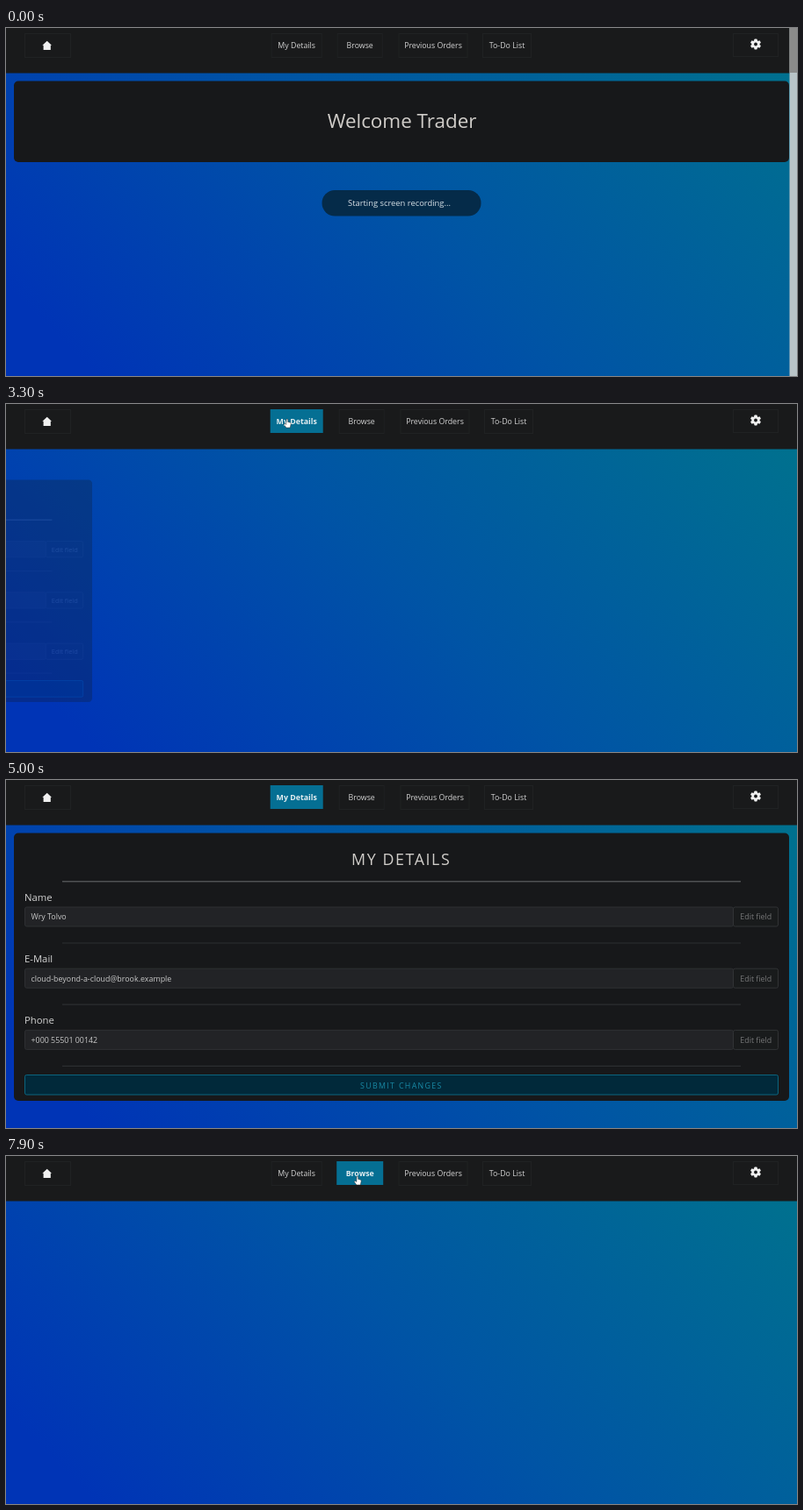
Animation of 900x397 px, one loop 8 s. Source, as an HTML page:

```html
<!DOCTYPE html>
<html lang="en">
<head>
<meta charset="utf-8">
<title>Trader dashboard</title>
<style>
  html, body { margin: 0; width: 100%; height: 100%; overflow: hidden; background: #0052a4; }
  svg { display: block; width: 100vw; height: 100vh; }
  text { font-family: "Open Sans", "Noto Sans", sans-serif; font-size: 8.8px; font-weight: 500; fill: #d3d3d3; }
  .mid { text-anchor: middle; }
  .cell { fill: none; stroke: #202223; }
  .active { fill: #056f93; stroke: none; }
  .active + text { font-weight: 650; fill: #e4eef1; }
  .card { fill: #17181a; }
  .title { font-size: 17.8px; letter-spacing: 1.6px; fill: #d0cdc9; }
  .label { font-size: 11.3px; }
  .value { font-size: 8.9px; fill: #c9c9c9; }
  .edit { font-size: 8.9px; fill: #757677; }
  .input { fill: #222326; stroke: #2e3033; }
  .button { fill: #191b1c; stroke: #313335; }
  .submit { fill: #01293a; stroke: #0b657f; }
  .submit + text { letter-spacing: 1.35px; fill: #1989a5; }
</style>
</head>
<body>
<svg viewBox="0 0 900 397" preserveAspectRatio="none">
  <defs>
    <linearGradient id="sky" gradientUnits="userSpaceOnUse" x1="0" y1="397" x2="648.5" y2="-251.5">
      <stop offset=".08" stop-color="#0034b6"/>
      <stop offset=".5" stop-color="#0054a5"/>
      <stop offset=".95" stop-color="#00708f"/>
    </linearGradient>
  </defs>
  <rect width="900" height="397" fill="url(#sky)"/>

  <g id="welcome">
    <rect class="card" x="9" y="60.5" width="882" height="92.5" rx="5"/>
    <text class="mid" x="450.5" y="113.5" style="font-size:22.4px;fill:#d0cdc9">Welcome Trader</text>
  </g>

  <g id="details">
    <rect class="card" x="9" y="60.5" width="882" height="305.5" rx="5"/>
    <text class="title" x="393" y="97">MY DETAILS</text>
    <path d="M64 115.7H836" stroke="#505254" stroke-width="1.6"/>
    <g id="fields"></g>
    <rect class="submit" x="21.5" y="336.5" width="857" height="22.5" rx="2"/>
    <text x="403" y="351.5">SUBMIT CHANGES</text>
  </g>

  <rect width="900" height="51.5" fill="#191a1b"/>
  <rect class="cell" x="21.5" y="6.5" width="52" height="27"/>
  <rect class="cell" x="827.5" y="6.5" width="51" height="26"/>
  <path d="M46.7 14.8L52 19.8H50.8V25H42.6V19.8H41.4Z" fill="#f0f0f0"/>
  <g id="gear" fill="#f0f0f0" transform="translate(853 18.5)"></g>
  <g id="nav"></g>

  <g id="toast">
    <rect x="359.5" y="185" width="181" height="29.5" rx="14.7" fill="#052b49"/>
    <text x="389" y="203" style="font-size:9.4px;font-weight:400;fill:#d8e0e6">Starting screen recording...</text>
  </g>
  <rect id="scrollbar" x="891.5" width="8.5" height="397" fill="#b9c4c8"/>
  <rect id="scrollthumb" x="891.5" width="8.5" height="51" fill="#8b8b8b"/>

  <g id="cursor" fill="#fff" stroke="#222" stroke-width=".5">
    <path id="arrow" d="M0 0V7.6L1.7 6.1L2.8 8.6L4.1 8L3 5.6H5.3Z"/>
    <path id="hand" d="M-1 -4.6Q0 -5.4 .7 -4.4V-1.6L3.2 -1Q4.4 -.6 4.2 .8L3.3 5H-1.2L-3.7 1.4Q-3.6 .1 -2.3 .6L-1.2 1.4Z"/>
  </g>
</svg>

<script>
const LOOP = 8000, STEP = 100;
const $ = id => document.getElementById(id);

const tabs = [
  { name: 'My Details', x: 330.7, w: 57 },
  { name: 'Browse', x: 402.7, w: 51 },
  { name: 'Previous Orders', x: 486, w: 78 },
  { name: 'To-Do List', x: 570, w: 55 }
];
$('nav').innerHTML = tabs.map(tab =>
  `<g><rect class="cell" y="6.5" height="27"/><text class="mid" y="22.7">${tab.name}</text></g>`).join('');

$('fields').innerHTML = [
  ['Name', 'Wry Tolvo'],
  ['E-Mail', 'cloud-beyond-a-cloud@brook.example'],
  ['Phone', '+000 55501 00142']
].map(([label, value], i) => `<g transform="translate(0 ${i * 70.2})">
  <text class="label" x="21" y="137.6">${label}</text>
  <rect class="input" x="21.5" y="145" width="806" height="22" rx="2"/>
  <text class="value" x="28.5" y="159.4">${value}</text>
  <rect class="button" x="827.5" y="145" width="51" height="22" rx="2"/>
  <text class="edit mid" x="853.3" y="159.4">Edit field</text>
  <path d="M64 186H836" stroke="#2c2e30" stroke-width="1.2"/></g>`).join('');

$('gear').innerHTML = [0, 60, 120].map(a =>
  `<rect x="-1.7" y="-6.1" width="3.4" height="12.2" rx=".8" transform="rotate(${a})"/>`).join('') +
  '<circle r="4.6"/><circle r="1.9" fill="#191a1b"/>';

// Piecewise linear value from [time, value] points.
function track(points, t) {
  if (t <= points[0][0]) return points[0][1];
  for (let i = 1; i < points.length; i++) {
    const [t0, a] = points[i - 1], [t1, b] = points[i];
    if (t <= t1) return a + (b - a) * (t - t0) / (t1 - t0);
  }
  return points[points.length - 1][1];
}
const progress = (t, start, end) => Math.min(1, Math.max(0, (t - start) / (end - start)));

const enterX = [[3000, -1100], [3300, -718], [3500, -250], [3600, -60], [3700, 10],
  [3800, 8], [3900, 3], [4000, -1], [4100, 0]];
const enterScale = [[3000, .76], [3300, .83], [3700, 1]];
const enterAlpha = [[3000, 0], [3300, .25], [3700, 1]];

// Each stop: time, x, y; the pointer eases between stops.
const path = [
  [900, 560, 145], [1500, 317, 20], [2800, 317, 20], [3300, 320, 22], [3600, 320, 22],
  [3900, 338.5, 45], [4800, 415, 385], [4900, 418, 402], [5600, 430, 402],
  [5700, 428, 372], [6500, 400, 60], [6800, 396, 38], [7200, 400, 28], [8000, 400, 28]
];
function pointerAt(t) {
  const i = path.findIndex(p => p[0] > t);
  const [t0, x0, y0] = path[i - 1], [t1, x1, y1] = path[i];
  const u = progress(t, t0, t1), e = u * u * (3 - 2 * u);
  return [x0 + (x1 - x0) * e, y0 + (y1 - y0) * e];
}

function place(el, cy, dx, scale, alpha) {
  el.setAttribute('opacity', alpha);
  el.setAttribute('transform',
    `translate(${450 + dx} ${cy}) scale(${scale}) translate(-450 ${-cy})`);
}
function leave(el, cy, u) {
  place(el, cy, 900 * u ** 2.2, 1 - .2 * u, 1 - u);
}
const show = (id, on) => $(id).setAttribute('visibility', on ? 'visible' : 'hidden');

function drawNav(active) {
  tabs.forEach((tab, i) => {
    const [box, label] = $('nav').children[i].children;
    const on = i === active;
    const shift = active === 0 && i > 0 ? 2 : 0;
    const w = on ? tab.w + (i ? 2 : 3) : tab.w;
    box.setAttribute('class', on ? 'active' : 'cell');
    box.setAttribute('x', tab.x + shift - w / 2);
    box.setAttribute('y', on ? 6 : 6.5);
    box.setAttribute('width', w);
    label.setAttribute('x', tab.x + shift);
  });
}

function draw(t) {
  drawNav(t < 2400 ? -1 : t < 7300 ? 0 : 1);
  leave($('welcome'), 107, progress(t, 2400, 2800));
  if (t < 7300) place($('details'), 213, track(enterX, t), track(enterScale, t), track(enterAlpha, t));
  else leave($('details'), 213, progress(t, 7300, 7700));

  $('toast').setAttribute('opacity', 1 - progress(t, 100, 600));
  show('scrollbar', t < 100);
  show('scrollthumb', t < 100);

  const visible = t >= 900;
  const pointing = t >= 1500 && t < 3700 || t >= 7000;
  show('arrow', visible && !pointing);
  show('hand', visible && pointing);
  if (visible) $('cursor').setAttribute('transform', `translate(${pointerAt(t)})`);
}

function tick() {
  const t = performance.now() % LOOP;
  draw(Math.floor(t / STEP) * STEP);
  requestAnimationFrame(tick);
}
tick();
</script>
</body>
</html>
```
